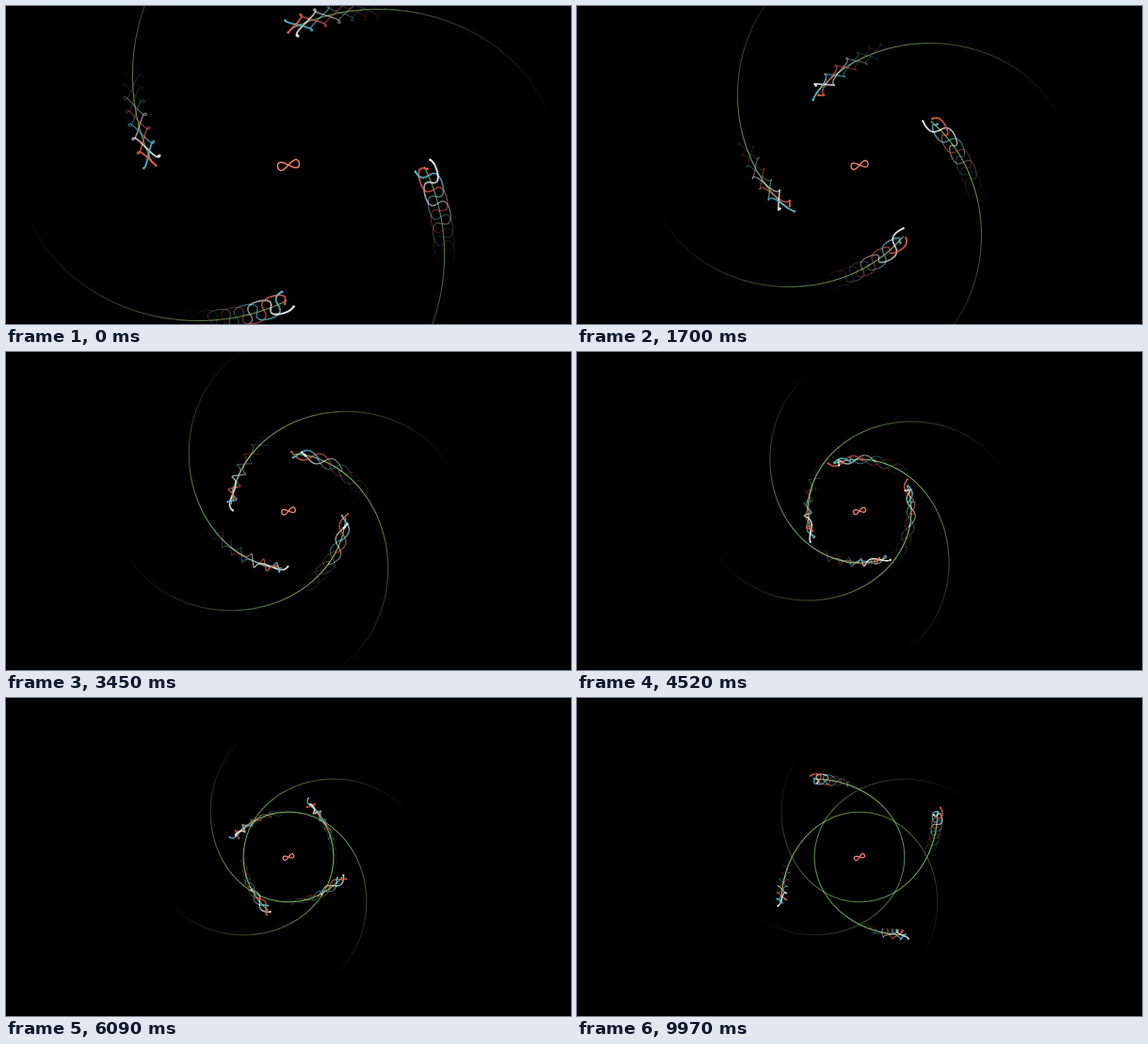
These frames come from a looping animation (600x338 px, 10 s). An HTML page with a canvas:

```html
<!DOCTYPE html>
<html lang="en">
<head>
<meta charset="utf-8">
<title>Orbiting figure eights</title>
<style>
html, body { margin: 0; width: 100%; height: 100%; overflow: hidden; background: #000; }
canvas { display: block; width: 600px; height: 338px; }
</style>
</head>
<body>
<canvas id="stage" width="600" height="338"></canvas>
<script>
const ctx = document.getElementById('stage').getContext('2d');
const LOOP = 10, TAU = Math.PI * 2, DEG = Math.PI / 180;

// Elliptic orbit with one focus in the middle of the stage
const ECC = 0.5, MAJOR = 95.6, MINOR = MAJOR * Math.sqrt(1 - ECC * ECC);
const RATE = 0.1705, NEAREST = 3.65;

// Three bodies chase each other on a small figure eight
const SPIN = TAU / 1.2, REACH = 5.4, DEPTH = 2.9, TAIL = 3.3;
const BODIES = [
  { color: [235, 98, 78], phase: 15 },
  { color: [92, 188, 212], phase: 255 },
  { color: [255, 255, 255], phase: 135 }
];

const clamp = v => Math.min(1, Math.max(0, v));
const smooth = v => { v = clamp(v); return v * v * (3 - 2 * v); };
const mix = (a, b, k) => a.map((v, i) => Math.round(v + (b[i] - v) * k));
const rgba = (c, a) => `rgba(${c[0]},${c[1]},${c[2]},${a.toFixed(3)})`;
const meanAt = t => RATE * (t - NEAREST);
const orbit = E => [MINOR * Math.sin(E), MAJOR * (Math.cos(E) - ECC)];

function anomaly(M) {
  let E = M;
  for (let i = 0; i < 7; i++) E -= (E - ECC * Math.sin(E) - M) / (1 - ECC * Math.cos(E));
  return E;
}

function turn([x, y], arm) {
  for (let i = 0; i < arm; i++) [x, y] = [y, -x];
  return [x, y];
}

function eight(phi, angle, reach, depth) {
  const x = reach * Math.sin(phi), y = depth * Math.sin(2 * phi);
  const c = Math.cos(angle), s = Math.sin(angle);
  return [x * c - y * s, x * s + y * c];
}

function axis(t, arm) {
  const tilt = -13 - 0.6 * t;
  return (arm % 2 ? tilt + 90 - 180 * smooth((t - 6.8) / 3.4) : tilt) * DEG;
}

function segment(a, b, style, width) {
  ctx.strokeStyle = style;
  ctx.lineWidth = width;
  ctx.beginPath();
  ctx.moveTo(a[0], a[1]);
  ctx.lineTo(b[0], b[1]);
  ctx.stroke();
}

function drawPath(t, zoom) {
  const now = meanAt(t), end = anomaly(now), begin = -2.85, steps = 110;
  for (let i = 0; i < steps; i++) {
    const E0 = begin + (end - begin) * i / steps;
    const E1 = begin + (end - begin) * (i + 1) / steps;
    const M = E0 - ECC * Math.sin(E0);
    const grown = clamp((M + 2.9) / 2.6);
    const alpha = grown * clamp(1 - (now - M) / 3.2);
    if (alpha < 0.01) continue;
    const style = rgba(mix([165, 165, 112], [142, 212, 104], grown), alpha);
    for (let arm = 0; arm < 4; arm++) {
      segment(turn(orbit(E0), arm), turn(orbit(E1), arm), style, 1.05 / zoom);
    }
  }
}

function drawStrands(t, zoom) {
  const steps = 132, track = [];
  for (let i = 0; i <= steps; i++) {
    const time = t - TAIL * (1 - i / steps);
    track.push({ time, at: orbit(anomaly(meanAt(time))) });
  }
  const thick = Math.pow(zoom, 0.4) / zoom;
  for (let arm = 0; arm < 4; arm++) {
    const lines = BODIES.map(({ phase }) => track.map(({ time, at }) => {
      const p = turn(at, arm);
      const o = eight(SPIN * time + phase * DEG, axis(time, arm), REACH, DEPTH);
      return [p[0] + o[0], p[1] + o[1]];
    }));
    for (let i = 0; i < steps; i++) {
      const u = (i + 1) / steps;
      lines.forEach((line, k) => segment(line[i], line[i + 1],
        rgba(BODIES[k].color, Math.pow(u, 1.5)), (0.6 + 0.95 * u * u) * thick));
    }
    lines.forEach((line, k) => {
      const [x, y] = line[steps];
      ctx.fillStyle = rgba(BODIES[k].color, 1);
      ctx.beginPath();
      ctx.arc(x, y, 0.9 * thick, 0, TAU);
      ctx.fill();
    });
  }
}

function drawCentre(t, zoom) {
  ctx.strokeStyle = 'rgb(240,128,106)';
  ctx.lineWidth = 1.3 * Math.pow(zoom, 0.2) / zoom;
  ctx.beginPath();
  for (let i = 0; i <= 60; i++) {
    const p = eight(TAU * i / 60, (-10 - 1.2 * t) * DEG, 5.8, 2.15);
    ctx.lineTo(p[0], p[1]);
  }
  ctx.stroke();
}

function draw(t) {
  const zoom = 1 / Math.min(1, 0.5 + 0.5 * t / 6.1);
  ctx.setTransform(1, 0, 0, 1, 0, 0);
  ctx.fillStyle = '#000';
  ctx.fillRect(0, 0, 600, 338);
  ctx.setTransform(zoom, 0, 0, zoom, 300, 169);
  drawPath(t, zoom);
  drawStrands(t, zoom);
  drawCentre(t, zoom);
}

const start = performance.now();
function tick() {
  draw((performance.now() - start) / 1000 % LOOP);
  requestAnimationFrame(tick);
}
tick();
</script>
</body>
</html>
```
